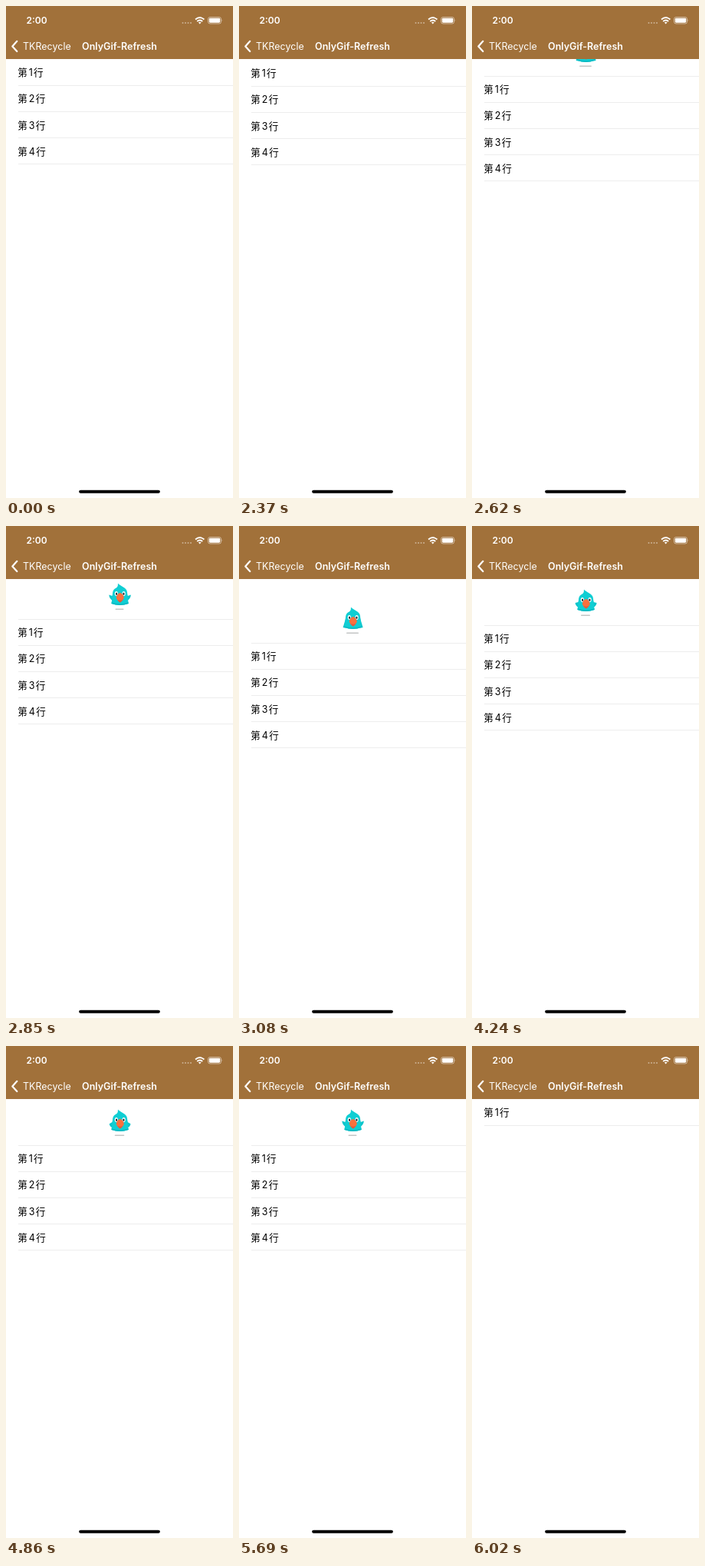
These frames come from a looping animation (296 by 640 pixels, 6.12 s). An HTML page:

```html
<!DOCTYPE html>
<html lang="zh-CN">
<head>
<meta charset="utf-8">
<title>Pull to refresh</title>
<style>
  html, body { margin: 0; width: 100%; height: 100%; overflow: hidden; background: #fff; }
  svg { display: block; width: 100vw; height: 100vh; }
  text { font-family: Inter, "Noto Sans CJK SC", "Noto Sans CJK", sans-serif; }
  .bar text { fill: #fff; font-size: 12.5px; }
  .bar .bold { font-weight: 600; }
  .row text { font-size: 12.6px; fill: #000; }
  .line { fill: #ededed; }
</style>
</head>
<body>
<svg viewBox="0 0 296 640">
  <rect width="296" height="640" fill="#fff"/>

  <g id="bird">
    <path id="wings" fill="#0cc4cb"/>
    <path fill="#10ced3" d="M146 .5 C148 4 157.500 5.500 158 12 L159.700 27 Q148.500 31 137.500 27 L139.200 12 Q139.800 8 144.500 6 Q146.300 4 146 .5Z"/>
    <path fill="#0bbac3" d="M137.700 25.300 Q148.500 29.300 159.600 25.300 L159.700 27 Q148.500 31 137.500 27Z"/>
    <g fill="#fff">
      <ellipse cx="143.900" cy="14" rx="2.100" ry="3"/>
      <ellipse cx="153.600" cy="14" rx="2.100" ry="3"/>
    </g>
    <g fill="#20343c">
      <ellipse cx="144.100" cy="14.300" rx="1.100" ry="1.800"/>
      <ellipse cx="153.400" cy="14.300" rx="1.100" ry="1.800"/>
    </g>
    <path fill="#f9703e" d="M148.800 13 C151.500 13.500 154.200 17.500 153.700 20 Q152 23.500 148.800 25.500 Q145.300 23.500 143.900 20 C143.300 17.500 146 13.500 148.800 13Z"/>
    <path fill="#e25a3c" d="M145 21.500 Q148.800 24 152.800 21.500 Q151.200 24 148.800 25.500 Q146.300 24 145 21.500Z"/>
    <rect id="shadow" y="33.500" height="1.500" rx=".75" fill="#c3c5c5"/>
  </g>

  <g id="list"></g>

  <g class="bar">
    <rect width="296" height="69" fill="#a1713a"/>
    <text class="bold" x="26.500" y="23" style="font-size:12px">2:00</text>
    <g fill="#fff" opacity=".45">
      <circle cx="230.500" cy="22" r="1"/><circle cx="234" cy="22" r="1"/>
      <circle cx="237.500" cy="22" r="1"/><circle cx="241" cy="22" r="1"/>
    </g>
    <g fill="none" stroke="#fff" stroke-width="1.800">
      <path d="M247 17.500 Q252.700 12.500 258.400 17.500"/>
      <path d="M249.200 20 Q252.700 17 256.200 20"/>
    </g>
    <path fill="#fff" d="M250.800 21.300 Q252.700 20 254.600 21.300 L252.700 23.400Z"/>
    <rect x="263.500" y="14.500" width="17" height="8.500" rx="2.500" fill="none" stroke="#fff" stroke-opacity=".5"/>
    <rect x="264.800" y="15.800" width="14.400" height="5.900" rx="1.400" fill="#fff"/>
    <path d="M281.600 17.300 Q283 18.700 281.600 20.200Z" fill="#fff" opacity=".5"/>
    <path d="M14.300 45.800 L8.300 52.400 L14.300 59" fill="none" stroke="#fff" stroke-width="2.200" stroke-linecap="round" stroke-linejoin="round"/>
    <text x="22" y="57">TKRecycle</text>
    <text class="bold" x="148" y="57" text-anchor="middle">OnlyGif-Refresh</text>
  </g>
  <rect x="95.150" y="629.800" width="105.700" height="3.950" rx="1.970" fill="#000"/>
</svg>

<script>
const LOOP = 6120, RELEASE = 3620, DONE = 5790, REST = 60, ROW = 34.15;
const $ = id => document.getElementById(id);

// [time, pull distance]
const pulls = [
  [0, 0], [2370, 1], [2490, 8], [2610, 22], [2730, 38], [2850, 52],
  [2960, 62], [3080, 83], [3190, 73], [RELEASE, REST],
  [DONE, 42], [5910, 9], [6020, 0]
];
const flaps = [3730, 3870, 3980, 4130, 4240, 4390, 4510, 4620, 4760,
  4860, 5010, 5120, 5240, 5350, 5490, 5590, 5690];
const steps = pulls.concat(flaps.map(t => [t, REST])).sort((a, b) => a[0] - b[0]);

const row = i => `<g class="row">
  <text x="15.2" y="${91.2 + i * ROW}">第<tspan dx="2">${i + 1}</tspan><tspan dx="1.2">行</tspan></text>
  <rect class="line" x="16" y="${Math.round(103 + i * ROW)}" width="280" height="1"/></g>`;
$("list").innerHTML = '<rect id="top" class="line" x="16" y="69" width="280" height="1"/>' +
  [0, 1, 2, 3].map(row).join("");
const rows = document.querySelectorAll(".row");

const mix = (a, b, k) => a + (b - a) * k;
const wave = p => .5 - .5 * Math.cos(2 * Math.PI * p);
const show = (el, on) => el.setAttribute("visibility", on ? "visible" : "hidden");

function poseBird(lift) {
  const out = mix(13, 14.3, lift), tip = mix(27, 15.5, lift), base = mix(27.5, 23, lift);
  const wing = s => {
    const x = d => 148.6 + s * d;
    return `M${x(9)} 13 L${x(10)} 17 L${x(out)} ${tip}
      Q${x(out - .5)} ${mix(tip, base, .7)} ${x(9.5)} ${base}Z`;
  };
  $("wings").setAttribute("d", wing(-1) + wing(1));
  const w = mix(16, 11, lift);
  $("shadow").setAttribute("x", 148 - w / 2);
  $("shadow").setAttribute("width", w);
}

function draw(t) {
  const [time, pull] = steps.filter(s => s[0] <= t).pop();
  const done = time >= DONE;
  $("list").setAttribute("transform", `translate(0 ${pull})`);
  $("bird").setAttribute("transform", `translate(0 ${22 + pull})`);
  show($("bird"), !done && pull > 0);
  show($("top"), pull > 1);
  rows.forEach((r, i) => show(r, i === 0 || !done));
  poseBird(time < RELEASE ? wave(pull / 20.8) : wave((time - RELEASE) / 375));
}

const start = performance.now();
function tick(now) {
  draw(Math.max(0, now - start) % LOOP);
  requestAnimationFrame(tick);
}
draw(0);
requestAnimationFrame(tick);
</script>
</body>
</html>
```
